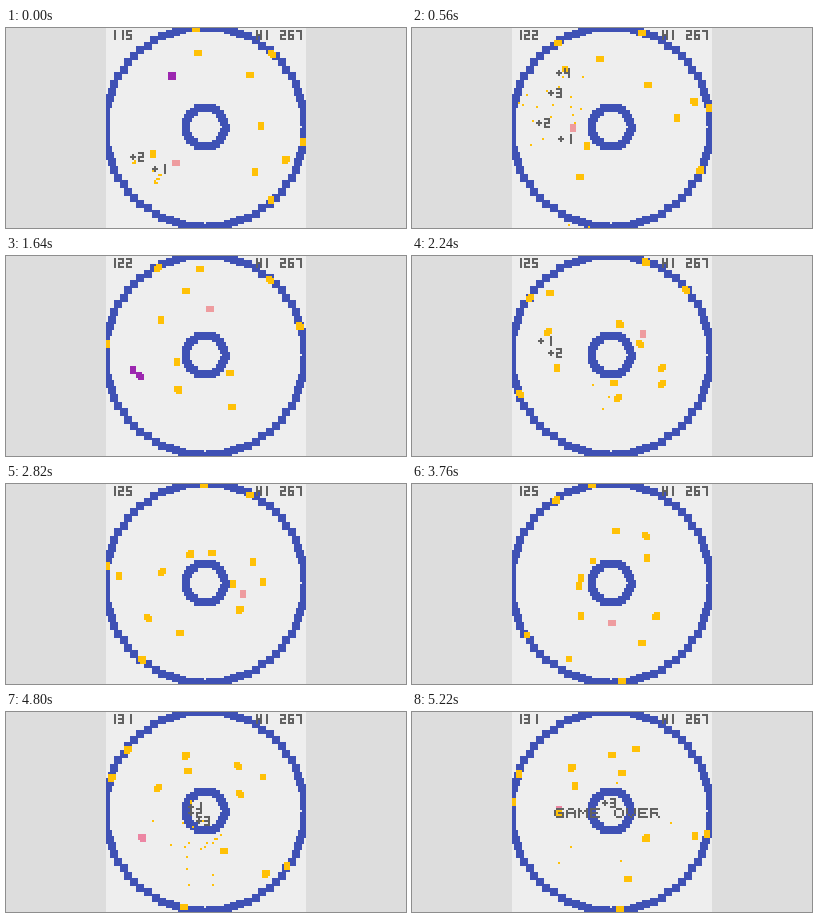
Write an HTML page with a canvas that moves like this. It is 400 px wide and 200 px high and loops after 6 s.

```html
<!DOCTYPE html>
<html lang="en">
<head>
<meta charset="utf-8">
<title>Orbit game</title>
<style>
html, body { margin: 0; width: 100%; height: 100%; overflow: hidden; background: #ddd; }
canvas { display: block; width: 400px; height: 200px; }
</style>
</head>
<body>
<canvas id="stage" width="400" height="200" role="img" aria-label="Orbit game, HI 267, GAME OVER"></canvas>
<script>
const ctx = document.getElementById('stage').getContext('2d');
const LOOP = 6000, TICK = 20, LAST = 261, BASE_SCORE = 112, POPUP_LIFE = 30, HOT = .4;
const BLUE = '#3f51b5', YELLOW = '#ffc107', PURPLE = '#9c27b0', GRAY = '#616161';
const SALMON = '#ee9c9f', PINK = '#ec86a3';

// A coin circles at radius r from angle a (degrees at 0 s) with w degrees per second
const orbit = (r, a, w, born = -1) => ({ r, a, w, born, pop: Infinity, points: 0 });
const rim = (a, i) => orbit(99, a, -35.2 - 4.3 * i);
const fast = (r, a, born) => orbit(r, a, -64 - .39 * r, born);

// Coins that touch pop one after the other, each worth one point more
const burst = (at, step, ...coins) =>
  coins.map((c, i) => ({ ...c, pop: at + step * i, points: i + 1 }));

const chain = burst(-.04, .02, orbit(71, 134, -60), orbit(80, 154, -60), orbit(61, 237, -133), orbit(60, 237, -72));
chain.slice(2).forEach(c => { c.pop += .36; });

const COINS = [
  ...[9, 48, -47, -95].map(rim),
  fast(67, 42), fast(56, -1), fast(69.5, 551, 4.9),
  orbit(87, 22, -70), orbit(58.5, 152.6, -54.6),
  orbit(43.5, 252.6, -76.2, 1.3), orbit(52.5, 161.5, -65.6, 2.2),
  orbit(44.5, 377.8, -65.2, 2.5), orbit(39, 528, -115.3, 4.1),
  ...chain,
  ...burst(1.74, .02, orbit(74, -95.4, -58.8), fast(68.5, -49)),
  ...burst(4.48, .1, orbit(31, 194.7, -96.9, .3), orbit(32, 447.3, -72.3, 2), orbit(28.5, 394.6, -139.4, 1.1))
];

// Strokes as xy pairs on the letter grid
const SMALL = {
  1: '2024', 2: '002022020424', 3: '00202404 0222', 4: '000222 2024',
  5: '200002222404', 6: '200004242202', 7: '002024', 8: '0020240400 0222',
  H: '0004 2024 0222', I: '1014', '+': '1113 0222'
};
const LARGE = {
  G: '4010 0103 14444222', A: '0104 1030 4144 0242', M: '0004 4044 002240',
  E: '40000444 0232', O: '1030 4143 3414 0301', V: '0002 4042 0224 4224',
  R: '0004 0030 4141 3202 2244'
};

function write(str, x, y, font, pitch) {
  ctx.fillStyle = GRAY;
  [...str].forEach((ch, i) => {
    for (const stroke of (font[ch] || '').split(' ')) {
      const p = [...stroke].map(Number);
      for (let k = 0; k + 3 < p.length; k += 2) {
        const dx = p[k + 2] - p[k], dy = p[k + 3] - p[k + 1];
        const n = Math.max(Math.abs(dx), Math.abs(dy));
        for (let s = 0; s <= n; s++) {
          ctx.fillRect(x + i * pitch + Math.round(p[k] + dx * s / n),
            y + Math.round(p[k + 1] + dy * s / n), 1, 1);
        }
      }
    }
  });
}

function polar(r, deg) {
  const a = deg * Math.PI / 180;
  return [50 + r * Math.cos(a), 50 + r * Math.sin(a)];
}

// Row of square blocks
function line([x0, y0], [x1, y1], size) {
  const dx = x1 - x0, dy = y1 - y0;
  const n = Math.max(2, Math.ceil(Math.max(Math.abs(dx), Math.abs(dy)) / size));
  for (let i = 0; i <= n; i++) {
    ctx.fillRect(Math.floor(x0 + dx * i / n - size / 2), Math.floor(y0 + dy * i / n - size / 2), size, size);
  }
}

function ring(r, parts) {
  ctx.fillStyle = BLUE;
  for (let i = 0; i < parts; i++) {
    line(polar(r, 360 * i / parts), polar(r, 360 * (i + 1) / parts), 4);
  }
}

// Short bar lying along the orbit
function bar(r, deg, color) {
  const [x, y] = polar(r / 2, deg), a = deg * Math.PI / 180;
  const tx = -Math.sin(a) * .5, ty = Math.cos(a) * .5;
  ctx.fillStyle = color;
  line([x - tx, y - ty], [x + tx, y + ty], 3);
}

function random(seed) {
  const v = Math.sin(seed * 127.1 + 3.7) * 43758.5453;
  return v - Math.floor(v);
}

const angleAt = (c, t) => c.a + c.w * t;

// The player bobs on its orbit, then makes one high jump
function drawPlayer(t) {
  const u = (t - 3.8) / 1.6;
  const jump = 96 * Math.max(0, u * (1 - u));
  const r = 41 + 5 * Math.cos(Math.PI * 2 * t / 1.64) + jump;
  bar(r, 128 + 91 * t - .43 * t ** 3, jump > 0 ? PINK : SALMON);
}

function drawSparks(c, id, n) {
  const [x, y] = polar(c.r / 2, angleAt(c, c.pop));
  ctx.fillStyle = YELLOW;
  for (let i = 0; i < 8; i++) {
    const seed = id * 40 + i * 3;
    if (n > 10 + random(seed) * 24) continue;
    const a = random(seed + 1) * Math.PI * 2;
    const d = (.6 + random(seed + 2) * 1.6) * 25 * (1 - .96 ** n);
    ctx.fillRect(Math.floor(x + Math.cos(a) * d), Math.floor(y + Math.sin(a) * d), 1, 1);
  }
}

function drawPopup(c, n) {
  if (n > POPUP_LIFE) return;
  const [x, y] = polar(c.r / 2, angleAt(c, c.pop));
  const rise = 20 * (1 - .9 ** n);
  write('+' + c.points, Math.floor(x) - 1, Math.floor(y - rise) - 2, SMALL, 4);
}

function draw(ms) {
  const tick = Math.min(LAST, Math.floor(ms / TICK + .001)), t = tick * TICK / 1000;
  ctx.setTransform(1, 0, 0, 1, 0, 0);
  ctx.fillStyle = '#ddd';
  ctx.fillRect(0, 0, 400, 200);
  ctx.save();
  ctx.setTransform(2, 0, 0, 2, 100, 0);
  ctx.beginPath();
  ctx.rect(0, 0, 100, 100);
  ctx.clip();
  ctx.fillStyle = '#eee';
  ctx.fillRect(0, 0, 100, 100);

  ring(50, 36);
  ring(10, 13);
  drawPlayer(t);

  const popped = [];
  let score = BASE_SCORE;
  COINS.forEach((c, id) => {
    const n = tick - Math.round(c.pop * 1000 / TICK);
    if (n >= 0) {
      score += c.points;
      popped.push([c, id, n]);
    } else if (t >= c.born) {
      bar(c.r, angleAt(c, t), t >= c.pop - HOT ? PURPLE : YELLOW);
    }
  });
  popped.forEach(([c, id, n]) => drawSparks(c, id, n));
  popped.forEach(([c, , n]) => drawPopup(c, n));

  write(String(score), 2, 1, SMALL, 4);
  write('HI 267', 75, 1, SMALL, 4);
  if (tick >= LAST) write('GAME OVER', 21, 48, LARGE, 6);
  ctx.restore();
}

const start = performance.now();
function frame() {
  draw((performance.now() - start) % LOOP);
  requestAnimationFrame(frame);
}
frame();
</script>
</body>
</html>
```
